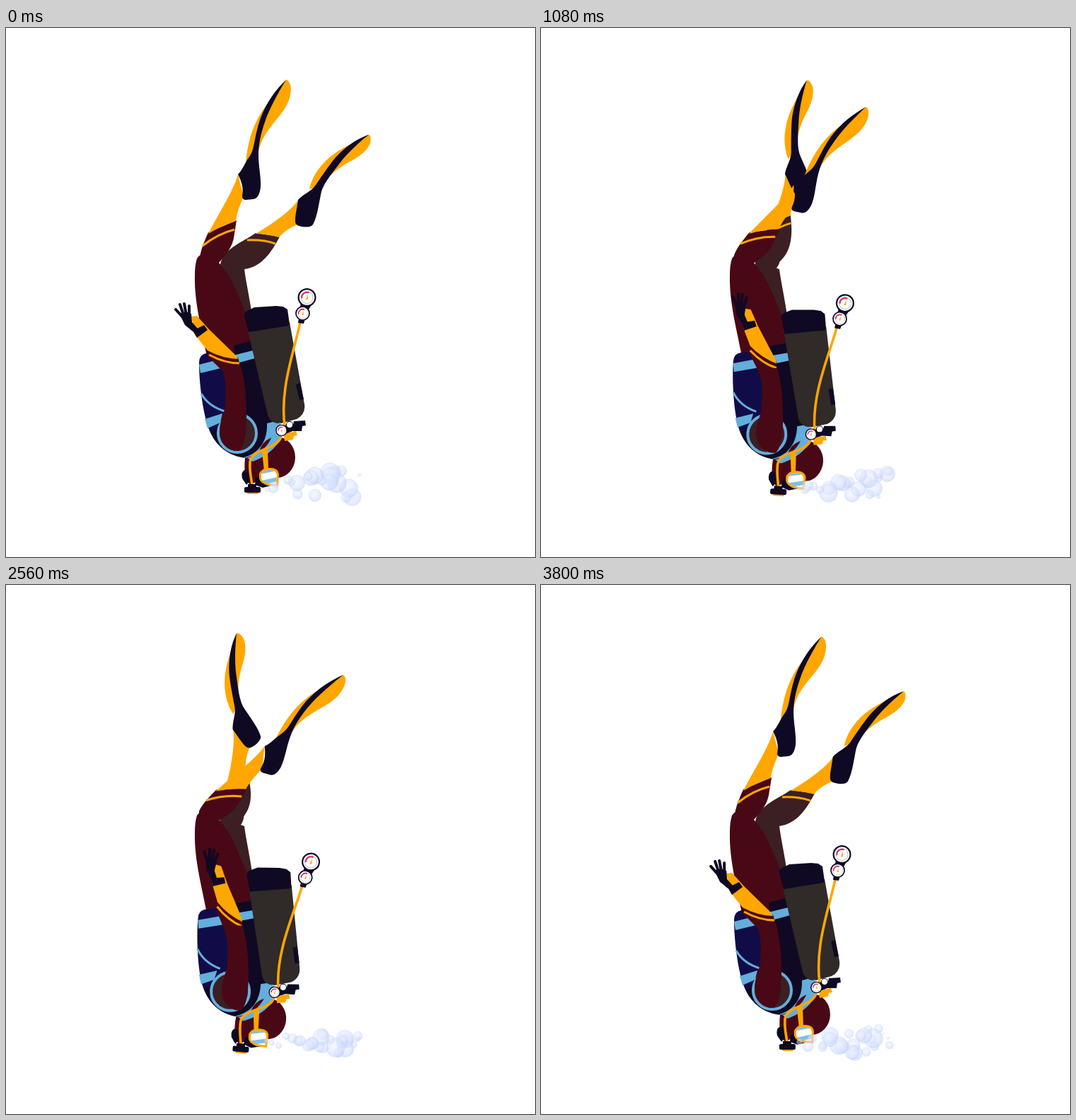
Animation, 748 px wide and 748 px high, one loop 3840 ms. Source, as an HTML page:

```html
<!DOCTYPE html>
<html lang="en">
<head>
<meta charset="utf-8">
<title>Diver</title>
<style>
  html, body { margin: 0; width: 100%; height: 100%; overflow: hidden; background: #fff; }
  svg { display: block; width: 100vw; height: 100vh; }
  .ink { fill: #0f0923; }
  .navy { fill: #110c48; }
  .suit { fill: #490815; }
  .shade { fill: #3b1f23; }
  .tank { fill: #302a28; }
  .gold { fill: #ffa600; }
  .sky { fill: #64aedb; }
  .hose, .band, .blue, .finger { fill: none; stroke: #ffa600; stroke-width: 3.6; }
  .band { stroke-width: 3; }
  .blue { stroke: #64aedb; stroke-width: 3; }
  .finger { stroke: #0f0923; stroke-width: 4; stroke-linecap: round; }
</style>
</head>
<body>
<svg viewBox="0 0 748 748">
  <defs>
    <radialGradient id="foam" cx=".42" cy=".4" r=".6">
      <stop offset="0" stop-color="#e8eeff" stop-opacity=".45"/>
      <stop offset=".65" stop-color="#d6e1fe" stop-opacity=".55"/>
      <stop offset="1" stop-color="#c3d2fa" stop-opacity=".6"/>
    </radialGradient>
    <g id="dial">
      <circle r="13" class="ink"/>
      <circle r="10.8" fill="#fff"/>
      <circle r="8.6" fill="none" stroke="#b9b4b8" stroke-width=".9"/>
      <path d="M-7.2,1A7.3,7.3 0 0 1 3,-6.6" fill="none" stroke="#e0246a" stroke-width="2"/>
      <path d="M-1.5,3L1.5,-5L1.4,3Z" class="gold"/>
    </g>
    <clipPath id="lens"><path d="M361,631Q364,625 371,625Q382,624 383,632L382,645L370,644Q362,641 361,637Z"/></clipPath>
  </defs>

  <!-- far leg -->
  <path class="shade" d="M308,346C312,365 322,390 338,440H352C348,395 340,365 337,341Q322,333 308,346Z"/>
  <g id="farLeg">
    <path class="shade" d="M303,335C304,325 312,316 322,309C332,302 343,297 353,290L387,295C376,316 362,338 337,341C328,350 306,348 303,335Z"/>
    <path class="gold" d="M353,291C375,278 400,261 414,243L420,275C404,280 394,287 386,296Q368,291 353,291Z"/>
    <path class="band" d="M341,300Q364,299 381,305"/>
    <path class="gold" d="M429,228C434,204 453,182 480,168L512,151C517,151 516,158 515,163C511,173 500,182 486,189C470,198 459,206 446,223Z"/>
    <path class="ink" d="M413,243C420,235 432,231 438,222C444,213 456,195 466,183C478,170 496,156 513,151C498,163 483,177 472,191C460,207 447,222 445,236C442,251 440,267 434,278C430,284 412,281 410,277C407,272 411,258 413,243Z"/>
  </g>

  <!-- near leg -->
  <path class="suit" d="M267,350C266,390 278,430 286,475L352,465C349,440 344,411 337,399C326,371 317,349 301,332C294,318 277,314 270,326Q267,335 267,350Z"/>
  <g id="nearLeg">
    <path class="suit" d="M286,289C280,303 275,314 274,326L282,342L300,333C314,318 320,308 322,297L326,272Z"/>
    <path class="gold" d="M328,207C321,232 301,261 286,291Q305,279 325,273C326,262 331,250 336,238Z"/>
    <path class="band" d="M278,308Q299,291 323,285"/>
    <path class="gold" d="M339,190C342,160 349,136 366,112L396,73C404,76 404,89 401,99C397,113 386,125 377,136C367,149 361,158 357,174Z"/>
    <path class="ink" d="M328,207C335,200 338,190 344,182C352,172 350,156 360,127C369,104 381,88 396,73C386,90 372,114 366,133C360,150 357,165 357,180C357,196 361,212 360,225C359,234 356,241 350,242L339,243Q334,243 334,238C336,227 334,219 328,207Z"/>
  </g>

  <g id="torso">
    <!-- vest -->
    <path class="navy" d="M273,473Q273,462 283,460L308,455L322,480L330,606C310,602 296,588 288,570C279,549 273,505 273,473Z"/>
    <path class="ink" d="M322,449L355,440C360,480 368,520 378,556C375,580 362,603 340,608C316,606 299,592 290,573L330,540Z"/>
    <path class="sky" d="M273,476L304,468L308,480L275,488Z"/>
    <path class="sky" d="M321,463L349,456L352,467L323,475Z"/>
    <path class="sky" d="M281,553L306,545L303,558L285,566Z"/>
    <path class="blue" d="M276,517C284,531 296,538 310,542"/>
    <path class="sky" d="M369,559L385,555L391,574C386,592 366,607 349,613L337,607C358,601 370,584 369,559Z"/>

    <!-- tank -->
    <path class="tank" d="M341,424L401,416L422,532Q424,546 411,553L389,559Q374,560 370,547Z"/>
    <path class="ink" d="M337,407Q336,402 341,400L351,395L382,393L392,394L398,398L401,419L399,421L343,430Z"/>
    <path class="ink" d="M410,504L416,502L421,525L415,526Z"/>

    <!-- head -->
    <path class="suit" d="M338,608L365,600L372,630L346,646Q335,640 338,608Z"/>
    <ellipse class="suit" cx="383" cy="607" rx="26" ry="29"/>
    <path class="sky" d="M380,560L388,558L391,574C386,592 366,607 349,613L341,608C362,602 378,586 380,560Z"/>
    <path class="ink" d="M337,625Q332,628 334,637L340,646L345,640L343,626Z"/>
    <path class="ink" d="M353,636L362,634L383,645L363,650L352,646Z"/>
    <path class="gold" d="M362,599L370,596L371,624L365,626Z"/>
    <path class="gold" d="M358,630Q362,622 371,622Q385,621 386,631L385,648L370,647Q359,643 358,637Z"/>
    <g clip-path="url(#lens)">
      <path fill="#fff" d="M355,620H390V650H355Z"/>
      <path class="sky" d="M358,631L388,625V619H358ZM357,641L388,634V640L357,647Z" opacity=".8"/>
    </g>

    <!-- regulator, hoses and dials -->
    <path class="hose" d="M389,578C382,597 348,594 345,614C344,628 347,637 348,646"/>
    <path class="gold" d="M340,655H358L356,659H342Z"/>
    <path class="ink" d="M342,645H354V649H358Q360,649 360,652V655Q360,657 357,657H340Q337,657 337,655V651Q337,649 340,649H342Z"/>
    <path class="ink" d="M394,561L406,561L407,556L423,555L424,562L419,563L418,570L405,570L396,574Z"/>
    <path class="gold" d="M393,574L410,570L412,576L407,577L406,582L394,584Z"/>
    <path class="hose" d="M416,416C408,455 387,510 394,562"/>
    <path class="ink" d="M417,387L432,391L425,404L421,418L413,417Z"/>
    <use href="#dial" x="425.500" y="381"/>
    <use href="#dial" transform="translate(419.500 403.500) scale(.8)"/>
    <use href="#dial" transform="translate(389.500 569) scale(.64)"/>
    <circle cx="401" cy="561" r="4.600" fill="#fff" stroke="#0f0923"/>
    <circle class="shade" cx="327" cy="573" r="27" stroke="#64aedb" stroke-width="4"/>
  </g>

  <g id="arm">
    <g id="forearm">
      <path class="suit" d="M284,456L328,466L332,480L322,494L305,484L286,465Z"/>
      <path class="gold" d="M262,408L270,407L287,426L323,461Q327,465 328,468Q305,467 285,456L268,435Z"/>
      <path class="band" d="M287,462Q309,474 330,474"/>
      <path class="ink" d="M264,428L280,420L285,427L270,438Z"/>
      <path class="ink" d="M245,404Q253,399 262,404L263,416L271,425L264,429L253,420Z"/>
      <path class="finger" d="M249,408L240,398M251,406L246,391M255,406L252,390M259,407L259,393"/>
    </g>
    <path class="suit" d="M303,478C310,490 312,508 310,532C309,547 302,553 302,573C304,590 317,599 329,598C338,592 340,570 340,546C340,520 337,495 332,478Z"/>
  </g>

  <g id="bubbles"></g>
</svg>
<script>
  const LOOP = 3840, STEP = 40;
  const MOUTH = { x: 362, y: 649 }, REACH = 168;
  const LEAD = 2.4, GAP = .075, COUNT = Math.ceil((LEAD + LOOP / 1000) / GAP);
  const el = id => document.getElementById(id);
  const move = (id, value) => el(id).setAttribute('transform', value);
  const turn = (id, deg, x, y) => move(id, `rotate(${deg} ${x} ${y})`);

  let seed = 29;
  const rand = () => (seed = seed * 16807 % 2147483647) / 2147483647;
  const between = (a, b) => a + (b - a) * rand();

  // the stream is already flowing when the loop begins
  const bubbles = Array.from({ length: COUNT }, (_, i) => {
    const node = document.createElementNS('http://www.w3.org/2000/svg', 'circle');
    node.setAttribute('fill', 'url(#foam)');
    node.setAttribute('stroke', '#b7c8f5');
    node.setAttribute('stroke-opacity', .35);
    node.setAttribute('stroke-width', .7);
    el('bubbles').append(node);
    return {
      node,
      born: (i + rand()) * GAP - LEAD,
      drag: between(.7, .9),
      rise: between(-25, 23),
      size: 6 + 8 * rand() ** 1.5,
      end: between(.66, .84)
    };
  });

  function drift(b, s) {
    const age = s - b.born;
    const way = 1 - Math.exp(-b.drag * age);
    const shown = age > 0 && way < b.end;
    b.node.style.display = shown ? '' : 'none';
    if (!shown) return;
    const pop = Math.min(1, (b.end - way) * 30);
    b.node.setAttribute('cx', MOUTH.x + REACH * way);
    b.node.setAttribute('cy', MOUTH.y + b.rise * Math.sqrt(way) - 5 * way);
    b.node.setAttribute('r', b.size * Math.min(1, .4 + 2 * way) * pop);
  }

  function draw(ms) {
    const p = (1 - Math.cos(2 * Math.PI * (ms - 20) / LOOP)) / 2;
    const wave = Math.sin(2 * Math.PI * p);
    const q = p + .05 * wave;
    turn('nearLeg', 27.3 * p, 290, 320);
    turn('farLeg', -59 * p, 320, 335);
    turn('torso', 6.6 * q, 300, 454);
    move('arm', `translate(${4 * q} ${5 * q})`);
    turn('forearm', 33.5 * (p + .08 * wave), 318, 478);
    for (const b of bubbles) drift(b, ms / 1000);
  }

  const start = performance.now();
  function tick() {
    const ms = (performance.now() - start) % LOOP;
    draw(Math.floor(ms / STEP) * STEP);
    requestAnimationFrame(tick);
  }
  draw(0);
  requestAnimationFrame(tick);
</script>
</body>
</html>
```
